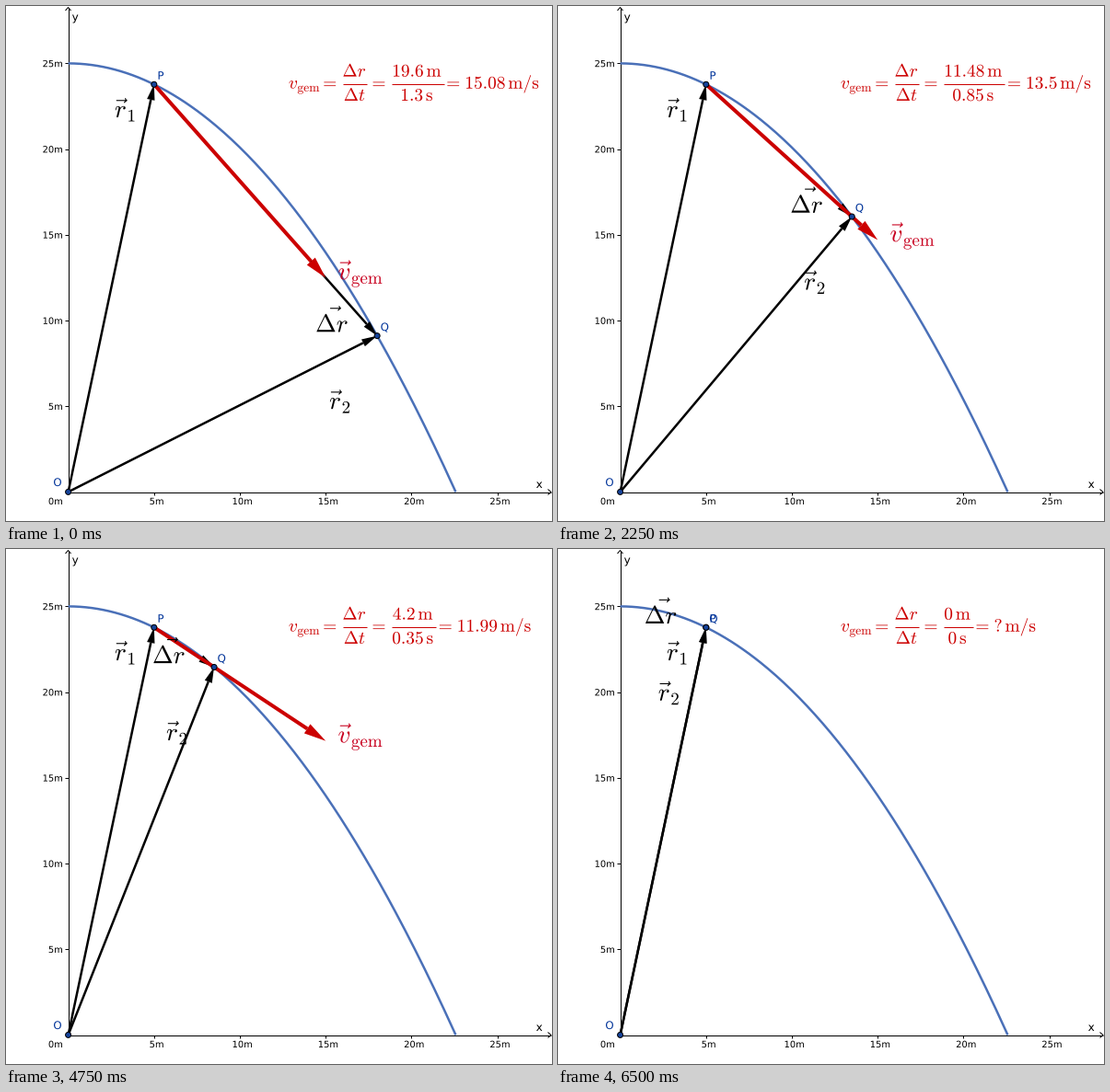
Animation of 593 by 560 pixels, one loop 6.55 s. Source, as a matplotlib script:

```python
import math

import matplotlib.pyplot as plt
import numpy as np
from matplotlib.animation import FuncAnimation
from matplotlib.patches import Circle, PathPatch, Polygon
from matplotlib.textpath import TextPath
from matplotlib.transforms import Affine2D

plt.rcParams["mathtext.fontset"] = "cm"

W, H, DPI = 593, 560, 64
FRAMES, STEP_MS = 131, 50
PT = 72 / DPI
OX, OY, UNIT = 67.6, 528.4, 18.64
G, SPEED, HEIGHT, T_P = 9.81, 10, 25, 0.5

NAVY, CURVE, RED, CRIMSON = "#003399", "#4a70b8", "#cc0000", "#c8001e"
LABEL, EQ = 27.2, 19.4

fig = plt.figure(figsize=(W / DPI, H / DPI), dpi=DPI, facecolor="white")
ax = fig.add_axes([0, 0, 1, 1])
ax.set(xlim=(0, W), ylim=(H, 0))
ax.axis("off")


def pix(x, y):
    return np.array([OX + UNIT * x, OY - UNIT * y])


def at(t):
    return pix(SPEED * t, HEIGHT - G * t * t / 2)


def line(xs, ys, width, color="black", z=1):
    return ax.plot(xs, ys, color=color, lw=width * PT, zorder=z,
                   solid_capstyle="butt")[0]


def text(x, y, s, size, color="black", align="origin", z=6):
    """Draw s with its baseline at y; x is the pen origin or an ink edge."""
    path = TextPath((0, 0), s, size=size, prop={"family": "DejaVu Sans"})
    box = path.get_extents()
    shift = {"origin": 0, "left": box.x0, "right": box.x1,
             "center": (box.x0 + box.x1) / 2}[align]
    path = Affine2D().scale(1, -1).translate(x - shift, y).transform_path(path)
    return ax.add_patch(PathPatch(path, fc=color, lw=0, zorder=z))


def vector(a, b, width, color, z):
    d = b - a
    length = math.hypot(*d)
    if length < 1e-6:
        return []
    u = d / length
    n = np.array([-u[1], u[0]])
    head = 24 if width > 3 else 17
    base = b - head * u
    side = n * head / 4
    return [line(*zip(a, base), width, color, z),
            ax.add_patch(Polygon([b, base + side, base - side], fc=color,
                                 lw=0, zorder=z))]


def dot(p):
    return ax.add_patch(Circle(p, 3, fc="#15439a", ec="black", lw=PT, zorder=5))


def num(v):
    return f"{v:.2f}".rstrip("0").rstrip(".")


def advance(s):
    """Width in em of a decimal number in Computer Modern."""
    return 0.5 * sum(c.isdigit() for c in s) + 0.278 * s.count(".")


def equation(dr, dt):
    top, bottom = num(dr), num(dt)
    speed = num(dr / dt) if dt else "?"
    wt = (advance(top) + 1.0) * EQ
    wb = (advance(bottom) + 0.561) * EQ
    width = max(wt, wb)
    x = 419.2
    mid, end = x + width / 2, x + width
    return [
        text(mid - wt / 2, 76.7, rf"${top}\,\mathrm{{m}}$", EQ, RED),
        text(mid - wb / 2, 103, rf"${bottom}\,\mathrm{{s}}$", EQ, RED),
        line([x, end + 2.5], [84.5, 84.5], 1, RED, 6),
        text(end + 6.2, 89.7, "$=$", EQ, RED, "left"),
        text(end + 25.2, 89.7, rf"${speed}\,\mathrm{{m/s}}$", EQ, RED),
    ]


def draw_static():
    line([67.5, 67.5], [2, 528.5], 1)
    line([67.5, 592], [528.5, 528.5], 1)
    line([64.5, 67.5, 70.5], [5, 1.5, 5], 1)
    line([588.5, 592, 588.5], [525.5, 528.5, 531.5], 1)
    for m in range(5, 30, 5):
        x, y = pix(m, m)
        line([x, x], [528.5, 532], 1)
        line([64, 67.5], [y, y], 1)
        text(x + 2.8, 542, f"{m}m", 9.9, align="center")
        text(61, y + 3.8, f"{m}m", 9.9, align="right")
    text(61, 542, "0m", 9.9, align="right")
    text(576, 524, "x", 12, align="left")
    text(72, 16, "y", 12, align="left")

    ts = np.linspace(0, math.sqrt(2 * HEIGHT / G), 200)
    line(*at(ts), 2.5, CURVE)
    vector(pix(0, 0), P, 2.5, "black", 2)
    dot(pix(0, 0))
    dot(P)
    text(52, 522, "O", 11.8, NAVY, "left")
    text(P[0] + 4.8, P[1] - 5.5, "P", 11.8, NAVY, "left")
    text(118, 121, r"$\vec{r}_1$", LABEL)

    text(307, 89.7, r"$v_{\mathrm{gem}}$", EQ, RED)
    text(345.3, 89.7, "$=$", EQ, RED, "left")
    text(365.5, 76.7, r"$\Delta r$", EQ, RED)
    text(366.8, 103, r"$\Delta t$", EQ, RED)
    line([365.5, 391.5], [84.5, 84.5], 1, RED, 6)
    text(398.5, 89.7, "$=$", EQ, RED, "left")


P = at(T_P)
draw_static()
moving = []


def update(i):
    while moving:
        moving.pop().remove()
    dt = round(1.3 - 0.01 * i, 2)
    q = at(T_P + dt)
    dr = math.hypot(*(q - P)) / UNIT

    moving.extend(vector(pix(0, 0), q, 2.5, "black", 2))
    moving.extend(vector(P, q, 2.5, "black", 2))
    if dt > 0:
        tip = P + (q - P) / dt
        moving.extend(vector(P, tip, 4, RED, 3))
        moving.append(text(360.5, tip[1] + 1.8, r"$\vec{v}_{\mathrm{gem}}$",
                           LABEL, CRIMSON))
    moving.append(dot(q))
    moving.append(text(q[0] + 4.2, q[1] - 5.5, "Q", 11.8, NAVY, "left"))
    moving.append(text(q[0] - 67, q[1] - 4.3, r"$\vec{\Delta r}$", LABEL))
    moving.append(text(q[0] - 52, q[1] + 79.5, r"$\vec{r}_2$", LABEL))
    moving.extend(equation(dr, dt))
    return moving


anim = FuncAnimation(fig, update, frames=FRAMES, interval=STEP_MS,
                     init_func=lambda: [], repeat=True, repeat_delay=0)
plt.show()
```
